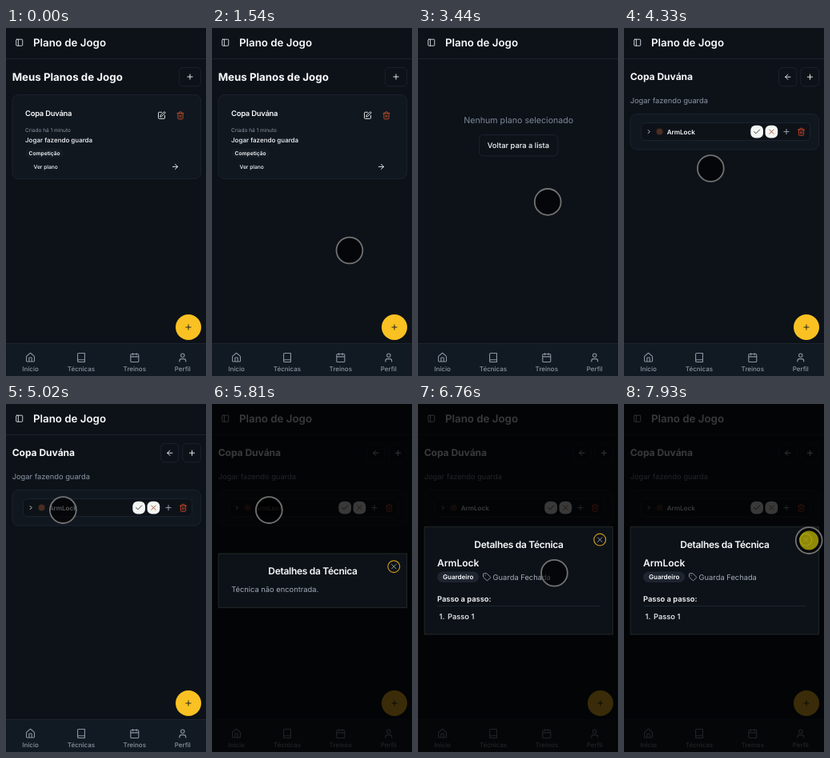
These frames come from a looping animation (250 by 435 pixels, 8 s). An HTML page with a canvas:

```html
<!DOCTYPE html>
<html lang="pt-BR">
<head>
<meta charset="utf-8">
<title>Plano de Jogo</title>
<style>
html, body { margin: 0; width: 100%; height: 100%; overflow: hidden; background: #0d1219; }
canvas { display: block; width: 250px; height: 435px; }
</style>
</head>
<body>
<canvas id="stage"></canvas>
<script>
const W = 250, H = 435, LOOP = 8000;
const canvas = document.getElementById('stage');
const ctx = canvas.getContext('2d');
const dpr = window.devicePixelRatio || 1;
canvas.width = W * dpr;
canvas.height = H * dpr;

const BG = '#0d1219', CARD = '#10171f', LINE = '#202833';
const WHITE = '#f8fafc', MUTED = '#8b95a3', GOLD = '#fac122', DARK = '#11161d';
const PLAN = 'Copa Duvána';

// Icon outlines on a 24-unit grid
const ICONS = {
  panel: 'M5 3h14a2 2 0 0 1 2 2v14a2 2 0 0 1-2 2H5a2 2 0 0 1-2-2V5a2 2 0 0 1 2-2zM9 3v18',
  house: 'M15 21v-8a1 1 0 0 0-1-1h-4a1 1 0 0 0-1 1v8M3 10a2 2 0 0 1 .7-1.5l7-6a2 2 0 0 1 2.6 0l7 6A2 2 0 0 1 21 10v9a2 2 0 0 1-2 2H5a2 2 0 0 1-2-2z',
  book: 'M4 19.5v-15A2.5 2.5 0 0 1 6.5 2H20v20H6.5a2.5 2.5 0 0 1 0-5H20',
  calendar: 'M8 2v4M16 2v4M5 4h14a2 2 0 0 1 2 2v14a2 2 0 0 1-2 2H5a2 2 0 0 1-2-2V6a2 2 0 0 1 2-2zM3 10h18',
  user: 'M19 21v-2a4 4 0 0 0-4-4H9a4 4 0 0 0-4 4v2M16 7a4 4 0 1 1-8 0a4 4 0 1 1 8 0',
  edit: 'M12 3H5a2 2 0 0 0-2 2v14a2 2 0 0 0 2 2h14a2 2 0 0 0 2-2v-7M18.4 2.6a2.1 2.1 0 0 1 3 3L12 15l-4 1 1-4z',
  trash: 'M3 6h18M19 6v14a2 2 0 0 1-2 2H7a2 2 0 0 1-2-2V6M8 6V4a2 2 0 0 1 2-2h4a2 2 0 0 1 2 2v2M10 11v6M14 11v6',
  tag: 'M12.6 2.6A2 2 0 0 0 11.2 2H4a2 2 0 0 0-2 2v7.2a2 2 0 0 0 .6 1.4l8.7 8.7a2.4 2.4 0 0 0 3.4 0l6.6-6.6a2.4 2.4 0 0 0 0-3.4zM7.5 7.5h.1',
  plus: 'M5 12h14M12 5v14',
  right: 'M5 12h14M12 5l7 7-7 7',
  left: 'M19 12H5M12 19l-7-7 7-7',
  chevron: 'M9 18l6-6-6-6',
  check: 'M20 6L9 17l-5-5',
  cross: 'M18 6L6 18M6 6l12 12'
};
for (const k in ICONS) ICONS[k] = new Path2D(ICONS[k]);

const clamp = v => Math.max(0, Math.min(1, v));
const ramp = (t, start, span) => clamp((t - start) / span);
const mix = (a, b, k) => `rgb(${a.map((v, i) => Math.round(v + (b[i] - v) * k))})`;

function icon(name, x, y, size, color, weight = 2) {
  ctx.save();
  ctx.translate(x - size / 2, y - size / 2);
  ctx.scale(size / 24, size / 24);
  ctx.strokeStyle = color;
  ctx.lineWidth = weight;
  ctx.lineCap = ctx.lineJoin = 'round';
  ctx.stroke(ICONS[name]);
  ctx.restore();
}

// y is the middle of the capitals
function text(str, x, y, size, weight, color, align = 'left', spacing = 0) {
  ctx.font = `${weight} ${size}px Inter, sans-serif`;
  ctx.textRendering = 'geometricPrecision';
  ctx.letterSpacing = spacing + 'px';
  ctx.textAlign = align;
  ctx.fillStyle = color;
  ctx.fillText(str, x, y + size * 0.364);
}

function box(x, y, w, h, r, fill, stroke) {
  ctx.beginPath();
  ctx.roundRect(x, y, w, h, r);
  if (fill) { ctx.fillStyle = fill; ctx.fill(); }
  if (stroke) { ctx.strokeStyle = stroke; ctx.lineWidth = 0.8; ctx.stroke(); }
}

function disc(x, y, r, fill, stroke, width) {
  ctx.beginPath();
  ctx.arc(x, y, r, 0, Math.PI * 2);
  if (fill) { ctx.fillStyle = fill; ctx.fill(); }
  if (stroke) { ctx.strokeStyle = stroke; ctx.lineWidth = width; ctx.stroke(); }
}

function rule(x, y, w, color = LINE) {
  ctx.fillStyle = color;
  ctx.fillRect(x, y, w, 0.8);
}

function frameBars() {
  ctx.fillStyle = BG;
  ctx.fillRect(0, 0, W, H);
  rule(0, 38.2, W);
  icon('panel', 16.7, 18.2, 10.7, '#dfe3e8');
  text('Plano de Jogo', 34, 18.2, 13.3, 600, WHITE);
  ctx.fillStyle = '#111922';
  ctx.fillRect(0, 394, W, H - 394);
  rule(0, 394, W);
  const tabs = [['house', 'Início', 30.5], ['book', 'Técnicas', 94], ['calendar', 'Treinos', 160.8], ['user', 'Perfil', 220.8]];
  for (const [name, label, x] of tabs) {
    icon(name, x, 412, 13.3, MUTED);
    text(label, x, 426.3, 8, 500, MUTED, 'center');
  }
}

function addButton() {
  disc(228, 374, 16, GOLD);
  icon('plus', 228, 374, 10.7, DARK);
}

function listPage(t) {
  text('Meus Planos de Jogo', 7.7, 61, 13.3, 700, WHITE);
  box(216.4, 49.4, 27.2, 23.4, 5, BG, LINE);
  icon('plus', 230, 61, 10.7, WHITE);
  box(7.9, 83.4, 235.8, 105, 8, CARD, LINE);
  text(PLAN, 24, 107, 9.33, 600, WHITE, 'left', -0.2);
  icon('edit', 194.5, 109.3, 10.7, WHITE);
  icon('trash', 218, 109.3, 10.7, '#c4532c');
  text('Criado há 1 minuto', 24, 127.6, 6.5, 400, MUTED);
  text('Jogar fazendo guarda', 24, 140.2, 8, 500, WHITE);
  box(24, 150.8, 48, 11.6, 5.8, '#151c25');
  text('Competição', 28.6, 156.6, 6.67, 600, WHITE);
  const k = ramp(t, 1935, 160);
  if (k) box(24, 164, 203.5, 18.7, 5.5, mix([16, 23, 31], [250, 193, 34], k));
  const ink = mix([248, 250, 252], [17, 22, 29], k);
  text('Ver plano', 34.6, 173.6, 6.67, 500, ink);
  icon('right', 211.5, 173.4, 10.7, ink);
  addButton();
}

function emptyPage() {
  text('Nenhum plano selecionado', 125.7, 115.6, 10.67, 400, '#7e8895', 'center');
  box(76.4, 133.6, 98.4, 26.2, 5, BG, LINE);
  text('Voltar para a lista', 125.4, 146.8, 9.33, 500, WHITE, 'center');
}

function detailPage() {
  text(PLAN, 7.7, 61, 12, 700, WHITE);
  box(193.6, 49.4, 22.2, 23.4, 5, BG, LINE);
  box(220.8, 49.4, 22.8, 23.4, 5, BG, LINE);
  icon('left', 204.8, 61.2, 10.7, WHITE);
  icon('plus', 232.5, 61.2, 10.7, WHITE);
  text('Jogar fazendo guarda', 7.7, 90.3, 9.33, 400, MUTED);
  box(7.9, 107.6, 235.8, 44.4, 8, CARD, LINE);
  box(21.6, 118.6, 211, 22, 5, BG, LINE);
  icon('chevron', 31.2, 129.6, 8, WHITE, 2.4);
  disc(44.5, 129.6, 4, '#4b2d21');
  text('ArmLock', 53.8, 129.6, 8, 600, WHITE);
  box(158.3, 121.8, 15.7, 15.6, 6, '#f5f6f4');
  icon('check', 166.2, 129.6, 10.7, '#26352d');
  box(176.5, 121.8, 15.7, 15.6, 6, '#f5f6f4');
  icon('cross', 184.4, 129.6, 10.7, '#a04a28');
  icon('plus', 203, 129.6, 10.7, '#a8afb8');
  icon('trash', 221.5, 129.8, 10.7, '#d04a2a');
  addButton();
}

function closeButton(y) {
  disc(227.3, y, 7.4, null, '#c4971e', 1.2);
  icon('cross', 227.3, y, 10.7, '#b4bac2', 1.8);
}

function dialog(t) {
  const fade = ramp(t, 5520, 200);
  const ease = 1 - (1 - fade) ** 3;
  ctx.fillStyle = `rgba(0,0,0,${0.77 * ease})`;
  ctx.fillRect(0, 0, W, H);
  ctx.save();
  ctx.globalAlpha = ease;
  const zoom = 0.95 + 0.05 * ease;
  ctx.translate(126, 221);
  ctx.scale(zoom, zoom);
  ctx.translate(-126, -221);
  const loaded = t >= 6520;
  const top = loaded ? 153.4 : 187;
  box(8, top, 235.6, loaded ? 134.6 : 67.6, 0, '#0d1218', '#28302d');
  text('Detalhes da Técnica', 126, top + 22, 12, 600, WHITE, 'center', -0.3);
  closeButton(top + 16.2);
  if (loaded) {
    text('ArmLock', 24, 199, 12, 600, WHITE);
    box(24, 209.4, 52, 13.6, 6.8, '#1e2530');
    text('Guardeiro', 50.2, 216.2, 8, 600, WHITE, 'center');
    icon('tag', 86, 216.2, 10.7, '#a3abb6');
    text('Guarda Fechada', 93.6, 216.2, 9.33, 400, '#a3abb6');
    text('Passo a passo:', 24, 243.2, 9.33, 600, WHITE);
    rule(24, 252.2, 203.6);
    text('1.', 26.6, 265.2, 9.33, 500, WHITE);
    text('Passo 1', 37, 265.2, 9.33, 500, WHITE);
  } else {
    text('Técnica não encontrada.', 24.2, 232, 9.33, 400, '#a3abb6');
  }
  ctx.restore();
}

// Pointer stops: time, x, y
const PATH = [
  [1120, 160, 458], [1400, 168, 335], [1650, 175, 240], [1850, 181, 190], [1960, 183, 172],
  [2100, 183.3, 166.4], [2290, 183.3, 166.4], [2500, 180, 169], [2770, 173, 176], [2960, 173, 176],
  [3170, 168, 204], [3350, 168, 205], [3440, 162.3, 217.3], [3650, 147, 229], [3900, 134, 221],
  [4150, 123, 202], [4330, 108.4, 175.6], [4520, 86, 150], [4750, 71.5, 139.5], [4940, 71.5, 139.5],
  [5020, 71.3, 132.6], [5860, 71.3, 132.6], [6100, 92, 200], [6350, 122, 270], [6450, 135, 279],
  [6760, 170.3, 211.4], [7000, 200, 182], [7250, 224, 172], [7400, 226.5, 175], [7600, 230.3, 172],
  [7790, 230.3, 172], [7930, 231.2, 170.6], [8000, 231.2, 170.6]
];

const slope = (i, axis) => {
  const a = PATH[i], b = PATH[i + 1];
  return a && b ? (b[axis] - a[axis]) / (b[0] - a[0]) : 0;
};
// Harmonic tangents keep the curve free of overshoot
const tangent = (i, axis) => {
  const a = slope(i - 1, axis), b = slope(i, axis);
  return a * b > 0 ? 2 * a * b / (a + b) : 0;
};

function along(t, axis) {
  let i = 0;
  while (i < PATH.length - 2 && t >= PATH[i + 1][0]) i++;
  const span = PATH[i + 1][0] - PATH[i][0];
  const u = clamp((t - PATH[i][0]) / span), v = 1 - u;
  return PATH[i][axis] * (1 + 2 * u) * v * v + tangent(i, axis) * span * u * v * v
    + PATH[i + 1][axis] * u * u * (3 - 2 * u) - tangent(i + 1, axis) * span * u * u * v;
}

function pointer(t) {
  if (t < 1190) return;
  const x = along(t, 1), y = along(t, 2);
  disc(x, y, 16.4, 'rgba(0,0,0,.64)', 'rgba(125,125,125,.9)', 1.8);
  const k = ramp(t, 7780, 140);
  if (k) {
    ctx.globalAlpha = k;
    disc(x, y, 12, '#8f8a06');
    disc(227.3, 169.6, 7.4, null, '#aaa010', 1.2);
    icon('cross', 227.3, 169.6, 10.7, '#aaa438', 1.8);
    ctx.globalAlpha = 1;
  }
}

function draw(t) {
  ctx.setTransform(dpr, 0, 0, dpr, 0, 0);
  frameBars();
  if (t < 2970) listPage(t);
  else if (t < 3600) emptyPage();
  else detailPage();
  if (t >= 5520) dialog(t);
  pointer(t);
}

const start = performance.now();
function tick() {
  draw((performance.now() - start) % LOOP);
  requestAnimationFrame(tick);
}
tick();
</script>
</body>
</html>
```
